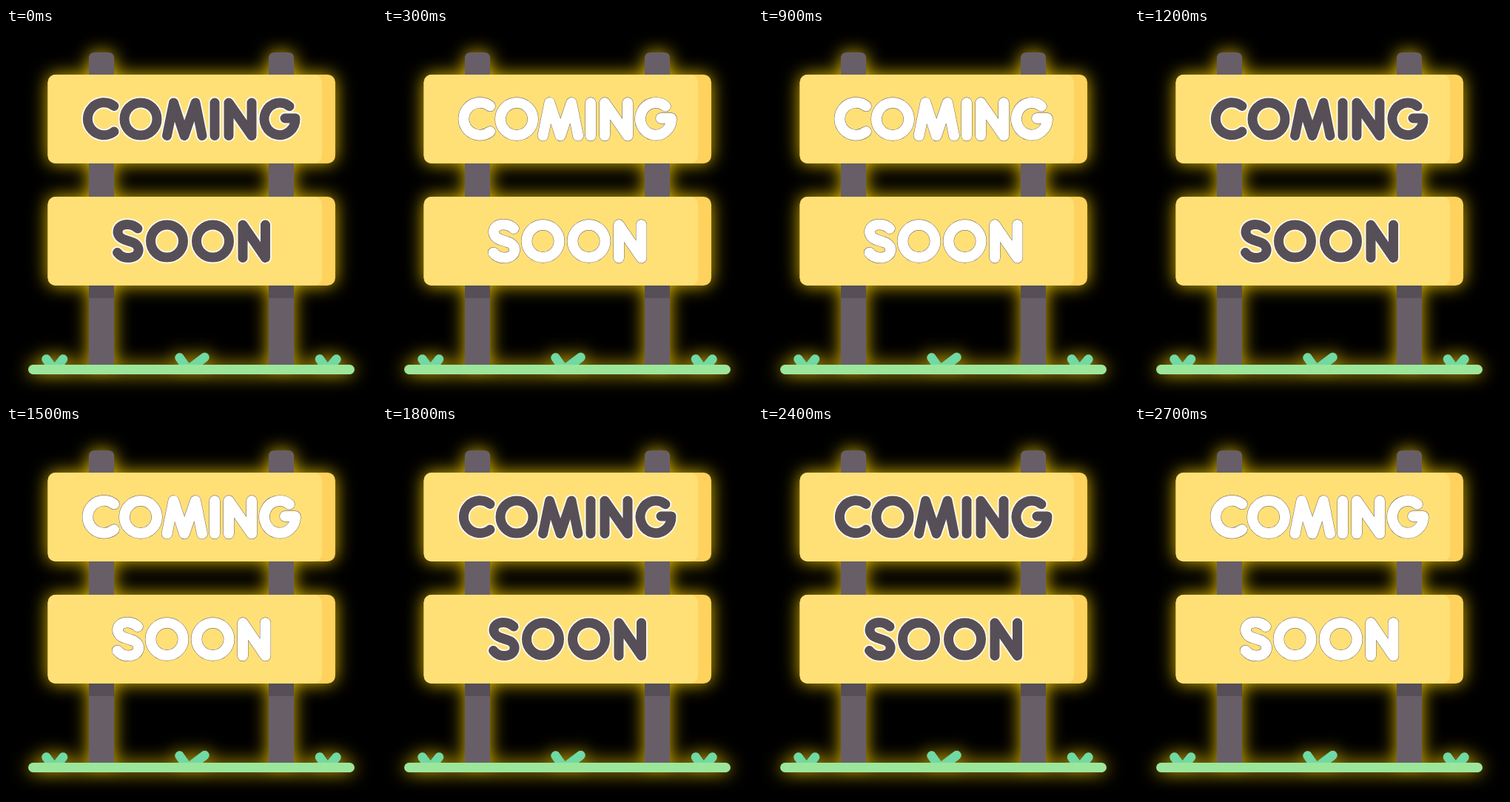
An HTML page that plays this animation: 500 px wide and 500 px high, repeating every 3000 ms.

```html
<!DOCTYPE html>
<html lang="en">
<head>
<meta charset="utf-8">
<title>Coming soon</title>
<style>
  html, body { margin: 0; width: 100%; height: 100%; overflow: hidden; background: #000; }
  svg { display: block; width: 100%; height: 100%; }
  .line { fill: none; stroke-linecap: round; stroke-linejoin: round; }
</style>
</head>
<body>
<svg viewBox="0 0 500 500" role="img" aria-label="COMING SOON">
  <defs>
    <filter id="glow" filterUnits="userSpaceOnUse" x="-50" y="-50" width="600" height="600" color-interpolation-filters="sRGB">
      <feDropShadow dx="0" dy="0" stdDeviation="12" flood-color="#ffd500" flood-opacity="0.85"/>
    </filter>
    <g id="post">
      <path d="M0 455V41Q0 33 8 33H26Q34 33 34 41V455Z" fill="#685e68"/>
      <rect y="340" width="34" height="25" fill="#574f57"/>
    </g>
    <g id="board">
      <rect x="56.5" width="388.5" height="120" rx="10.5" fill="#ffd15d"/>
      <rect x="56.5" width="370.5" height="120" rx="10.5" fill="#ffe077"/>
    </g>
    <g id="word">
      <path d="M146 105.5A22 22 0 1 0 146 140"/>
      <circle cx="182" cy="123" r="22"/>
      <path d="M217.5 145.5L226.5 101L241 145.5L256 101L265 145.5"/>
      <path d="M282 101V145.5"/>
      <path d="M301 145.5V101L332 145.5V101"/>
      <path d="M383 105.7A21 21.8 0 1 0 391 122H377"/>
      <path d="M178 271Q172 265.5 164 265.5C148 265.5 147 282 160 286L169 289C184 293 182 310.5 165 310.5Q156 310.5 150.5 303.5"/>
      <circle cx="217.5" cy="288" r="22"/>
      <circle cx="279.5" cy="288" r="22"/>
      <path d="M320 310.5V266L350.5 310.5V266"/>
    </g>
  </defs>
  <rect width="500" height="500"/>
  <g filter="url(#glow)">
    <use href="#post" x="112"/>
    <use href="#post" x="355"/>
    <use href="#board" y="63"/>
    <use href="#board" y="228"/>
    <path class="line" stroke="#70d9a4" stroke-width="12.5"
      d="M54.5 447.5L63 459H68L77 447.5M234.5 445.5L244 459H250L268.5 445M424 447.5L432 459H437L446.5 447.5"/>
    <rect x="30" y="455" width="441" height="13" rx="6.5" fill="#9be69b"/>
  </g>
  <use id="edge" class="line" href="#word"/>
  <use id="face" class="line" href="#word"/>
</svg>
<script>
  const BLINK = 300;
  const looks = [
    { edge: ['#fffdf4', 16.6], face: ['#574f57', 13] },
    { edge: ['#574f57', 15], face: ['#ffffff', 14.2] }
  ];
  const parts = {
    edge: document.getElementById('edge'),
    face: document.getElementById('face')
  };

  function draw(ms) {
    const look = looks[Math.floor(ms / BLINK) % 2];
    for (const [name, [color, width]] of Object.entries(look)) {
      parts[name].setAttribute('stroke', color);
      parts[name].setAttribute('stroke-width', width);
    }
  }

  const start = performance.now();
  function tick() {
    draw(performance.now() - start);
    requestAnimationFrame(tick);
  }
  tick();
</script>
</body>
</html>
```
